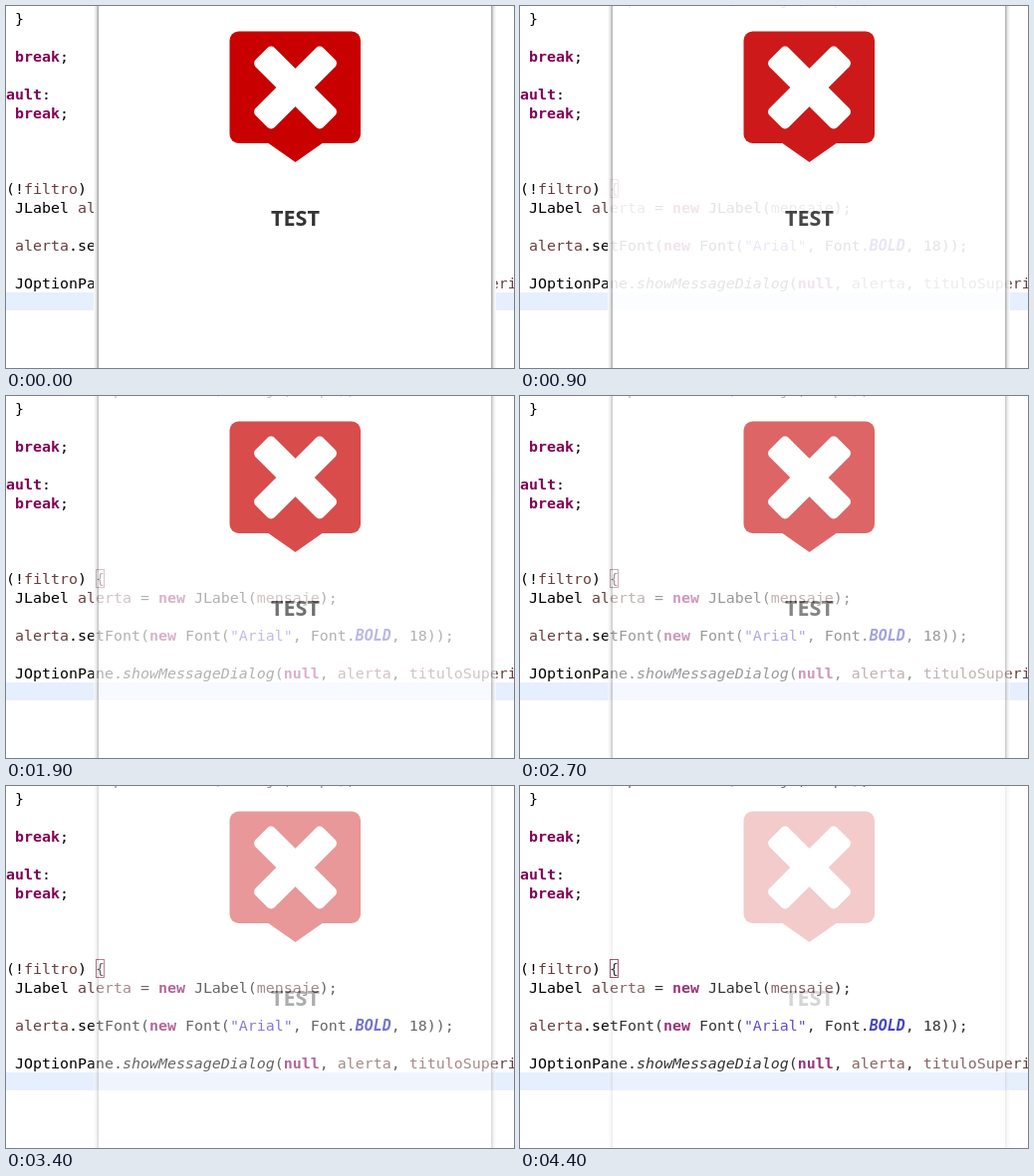
Animation of 510 by 364 pixels, one loop 4800 ms. Source, as an HTML page:

```html
<!DOCTYPE html>
<html lang="es">
<head>
<meta charset="utf-8">
<title>Fading alert</title>
<style>
  html, body { margin: 0; width: 100%; height: 100%; overflow: hidden; background: #fff; }
  svg { display: block; width: 510px; height: 364px; }
  .code { font: 14.95px "DejaVu Sans Mono", "Noto Sans Mono", monospace; fill: #000; }
  .code text { white-space: pre; }
  .key { font-weight: 700; fill: #7f0055; }
  .var { fill: #6a3e3e; }
  .str { fill: #3a20c8; }
  .call { font-style: italic; }
  .const { font-style: italic; font-weight: 700; fill: #1818b0; }
  .title { font: 700 21.5px "Noto Sans", "Open Sans", sans-serif; fill: #333; text-anchor: middle; }
  .alert { animation: fade 4.8s step-end infinite; }
  @keyframes fade {
    0% { opacity: 1; }
    18.75% { opacity: .9; }
    29.16% { opacity: .8; }
    39.58% { opacity: .7; }
    50% { opacity: .6; }
    60.41% { opacity: .5; }
    70.83% { opacity: .4; }
    81.25% { opacity: .3; }
    89.58%, 100% { opacity: .2; }
  }
</style>
</head>
<body>
<svg viewBox="0 0 510 364">
  <defs>
    <linearGradient id="edge">
      <stop offset="0" stop-color="#fff"/>
      <stop offset=".5" stop-color="#e4e4e4"/>
      <stop offset="1" stop-color="#a0a0a0"/>
    </linearGradient>
  </defs>

  <rect y="288" width="510" height="18" fill="#e6effd"/>
  <g class="code">
    <text x="108" y="-1" class="var">panelAux = (mensaje, tipo);</text>
    <text x="9" y="18">}</text>
    <text x="9" y="56"><tspan class="key">break</tspan>;</text>
    <text x="0" y="94"><tspan class="key">ault</tspan>:</text>
    <text x="9" y="113"><tspan class="key">break</tspan>;</text>
    <text x="0" y="189">(!<tspan class="var">filtro</tspan>) {</text>
    <text x="9" y="208">JLabel <tspan class="var">alerta</tspan> = <tspan class="key">new</tspan> JLabel(<tspan class="var">mensaje</tspan>);</text>
    <text x="9" y="246"><tspan class="var">alerta</tspan>.setFont(<tspan class="key">new</tspan> Font(<tspan class="str">"Arial"</tspan>, Font.<tspan class="const">BOLD</tspan>, 18));</text>
    <text x="9" y="284">JOptionPane.<tspan class="call">showMessageDialog</tspan>(<tspan class="key">null</tspan>, <tspan class="var">alerta</tspan>, <tspan class="var">tituloSuperior</tspan></text>
  </g>
  <rect x="90.5" y="174.5" width="8" height="18" fill="none" stroke="#8c3050"/>

  <g class="alert">
    <rect x="88" width="404" height="364" fill="#fff"/>
    <rect x="88" width="5" height="364" fill="url(#edge)"/>
    <rect x="-492" width="5" height="364" fill="url(#edge)" transform="scale(-1 1)"/>
    <g fill="#c80000">
      <rect x="224.5" y="25.5" width="131.5" height="112.5" rx="9"/>
      <path d="M262 137 L290.5 157 L319 137Z"/>
    </g>
    <g fill="#fff" transform="translate(290.5 82) rotate(45)">
      <rect x="-48" y="-13.5" width="96" height="27" rx="5"/>
      <rect x="-13.5" y="-48" width="27" height="96" rx="5"/>
    </g>
    <text class="title" x="290.5" y="221">TEST</text>
  </g>
</svg>
</body>
</html>
```
